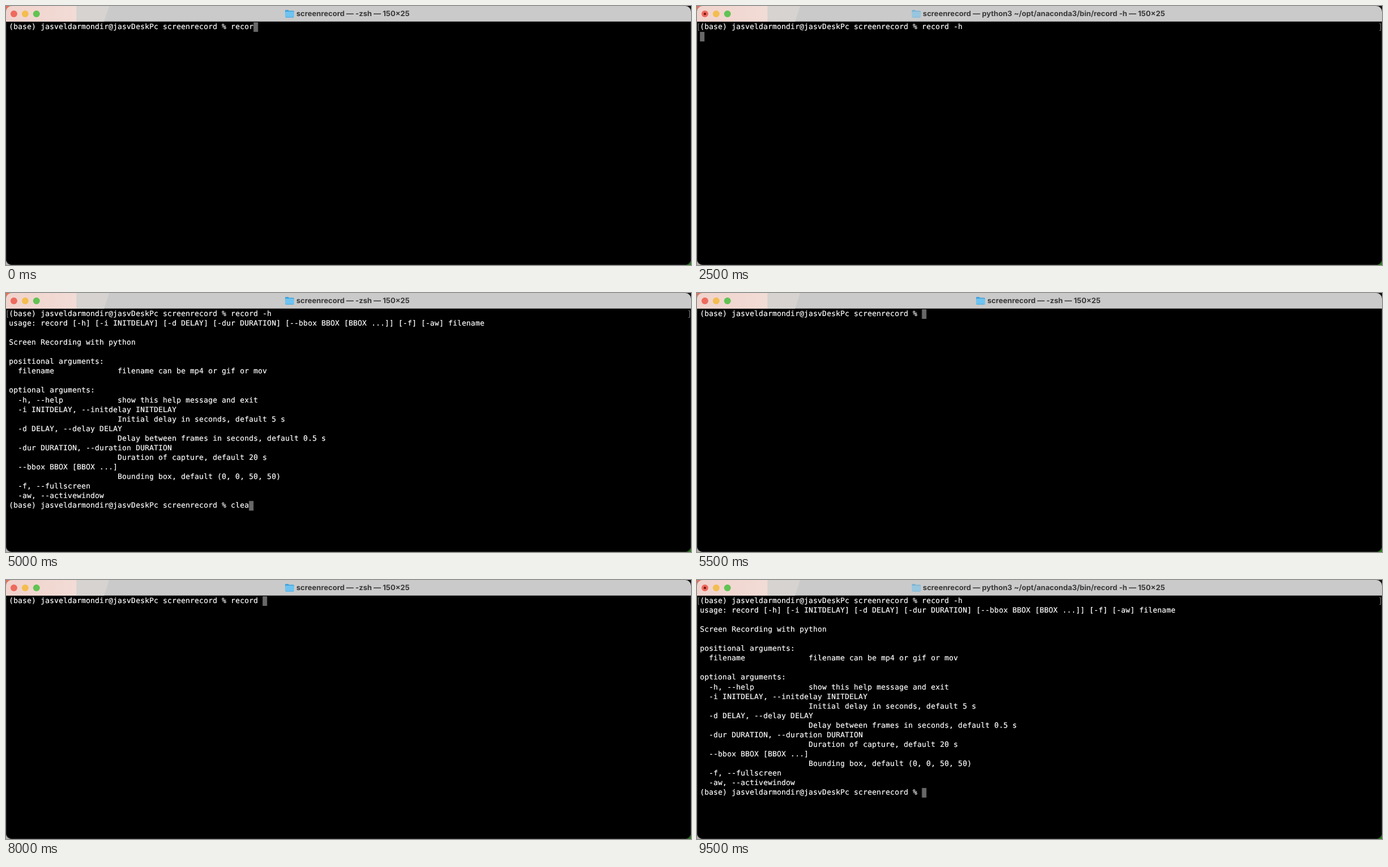
These frames come from a looping animation (1215x461 px, 10000 ms). An HTML page:

```html
<!DOCTYPE html>
<html lang="en">
<head>
<meta charset="utf-8">
<title>Terminal</title>
<style>
/* one character cell, and the top left corner of the text area */
:root { --w: 8.034px; --h: 17.06px; --x: 5.2px; --y: 29px; }
html, body { margin: 0; width: 100%; height: 100%; overflow: hidden; }
body {
  position: relative;
  background:
    linear-gradient(#e8705a, #e8705a) 0 0 / 20px 20px no-repeat,
    linear-gradient(#b4b0ae, #b4b0ae) 0 100% / 20px 20px no-repeat,
    linear-gradient(#2f7a25, #2f7a25) 100% 100% / 20px 20px no-repeat,
    #111;
}
.window {
  position: absolute; left: 0; top: 0; width: 1215px; height: 461px;
  border-radius: 10px; overflow: hidden; background: #000;
}
.edge {
  position: absolute; inset: 28px 0 0; border: 1px solid #262626; border-top: 0;
  border-radius: 0 0 10px 10px;
}
svg { position: absolute; left: 0; top: 0; }
svg text { font: 700 13.08px Inter, "Open Sans", sans-serif; fill: #393939; text-rendering: geometricPrecision; }
pre, .typed { position: absolute; margin: 0; }
pre {
  top: var(--y); left: var(--x); color: #fff;
  font: 13px/var(--h) "DejaVu Sans Mono", "Noto Sans Mono", monospace;
  letter-spacing: .207px; text-rendering: geometricPrecision;
  -webkit-text-stroke: .2px #fff;
}
.typed { left: calc(var(--w) * 49); top: 0; height: var(--h); overflow: hidden; }
.last { top: calc(var(--h) * 19); }
.help { top: calc(var(--y) + var(--h)); }
.cursor { width: var(--w); height: var(--h); fill: #686868; }

.typed, .cursor, .help, .marks, .busy, .idle { animation: 10s step-end infinite; }
.cmd { animation-name: cmd; }
.clear { animation-name: clear; }
.cursor { animation-name: cursor; }
.help { animation-name: help; }
.marks { animation-name: marks; }
.busy { animation-name: busy; }
.idle { animation-name: idle; }

@keyframes cmd {
  0% { width: calc(var(--w) * 5); }
  5%, 75% { width: calc(var(--w) * 6); }
  10%, 80% { width: calc(var(--w) * 7); }
  15%, 85% { width: calc(var(--w) * 8); }
  20%, 90%, 100% { width: calc(var(--w) * 9); }
  55% { width: 0; }
  65% { width: calc(var(--w) * 2); }
  70% { width: calc(var(--w) * 4); }
}
@keyframes clear {
  0%, 55%, 100% { width: 0; }
  45% { width: var(--w); }
  50% { width: calc(var(--w) * 4); }
}
@keyframes cursor {
  0% { transform: translate(calc(var(--w) * 54), 0); }
  5%, 75% { transform: translate(calc(var(--w) * 55), 0); }
  10%, 80% { transform: translate(calc(var(--w) * 56), 0); }
  15%, 85% { transform: translate(calc(var(--w) * 57), 0); }
  20%, 90% { transform: translate(calc(var(--w) * 58), 0); }
  25% { transform: translate(0, var(--h)); }
  30%, 95%, 100% { transform: translate(calc(var(--w) * 49), calc(var(--h) * 20)); }
  45% { transform: translate(calc(var(--w) * 50), calc(var(--h) * 20)); }
  50% { transform: translate(calc(var(--w) * 53), calc(var(--h) * 20)); }
  55% { transform: translate(calc(var(--w) * 49), 0); }
  65% { transform: translate(calc(var(--w) * 51), 0); }
  70% { transform: translate(calc(var(--w) * 53), 0); }
}
@keyframes help { 0%, 55% { opacity: 0; } 30%, 95%, 100% { opacity: 1; } }
@keyframes marks { 0%, 55% { opacity: 0; } 25%, 95%, 100% { opacity: 1; } }
@keyframes busy { 0%, 30% { opacity: 0; } 25%, 95%, 100% { opacity: 1; } }
@keyframes idle { 0%, 30% { opacity: 1; } 25%, 95%, 100% { opacity: 0; } }
</style>
</head>
<body>
<div class="window">
  <div class="edge"></div>
  <svg width="1215" height="461" viewBox="0 0 1215 461">
    <defs>
      <linearGradient id="blush">
        <stop offset="0" stop-color="#f0d3cc"/>
        <stop offset="1" stop-color="#f2dcd6"/>
      </linearGradient>
      <g id="folder">
        <path d="M0 8.5a1.5 1.5 0 0 1 1.5-1.5h4l1.6 1.6h7.4a1.5 1.5 0 0 1 1.5 1.5v3H0z" fill="#3fa3dc"/>
        <rect y="10" width="16" height="10.5" rx="1.5" fill="#6fc3f0"/>
        <path d="M1 20h14" stroke="#4aa9de"/>
      </g>
    </defs>
    <rect width="1215" height="27.7" fill="#cacaca"/>
    <path d="M125 0h58l-9 27.7h-49z" fill="#d6d3d1"/>
    <rect width="125" height="27.7" fill="url(#blush)"/>
    <circle cx="14" cy="14" r="6" fill="#ed6a5e"/>
    <circle cx="34" cy="14" r="6" fill="#f4bd4f"/>
    <circle cx="54" cy="14" r="6" fill="#61c354"/>
    <g class="idle">
      <use href="#folder" x="495"/>
      <text x="515" y="18">screenrecord — -zsh — 150×25</text>
    </g>
    <g class="busy">
      <circle cx="14" cy="14" r="2.2" fill="#7d1610"/>
      <use href="#folder" x="381" opacity=".55"/>
      <text x="400.6" y="18">screenrecord — python3 ~/opt/anaconda3/bin/record -h — 150×25</text>
    </g>
    <path class="marks" d="M4 31.5H2.5V43.5H4M1210.5 31.5H1212.5V43.5H1210.5" fill="none" stroke="#8c8c8c"/>
    <rect class="cursor" x="5.2" y="29"/>
  </svg>
  <pre>(base) jasveldarmondir@jasvDeskPc screenrecord % <span class="typed cmd">record -h</span></pre>
  <pre class="help">usage: record [-h] [-i INITDELAY] [-d DELAY] [-dur DURATION] [--bbox BBOX [BBOX ...]] [-f] [-aw] filename

Screen Recording with python

positional arguments:
  filename              filename can be mp4 or gif or mov

optional arguments:
  -h, --help            show this help message and exit
  -i INITDELAY, --initdelay INITDELAY
                        Initial delay in seconds, default 5 s
  -d DELAY, --delay DELAY
                        Delay between frames in seconds, default 0.5 s
  -dur DURATION, --duration DURATION
                        Duration of capture, default 20 s
  --bbox BBOX [BBOX ...]
                        Bounding box, default (0, 0, 50, 50)
  -f, --fullscreen
  -aw, --activewindow
(base) jasveldarmondir@jasvDeskPc screenrecord % <span class="typed clear last">clea</span></pre>
</div>
</body>
</html>
```
